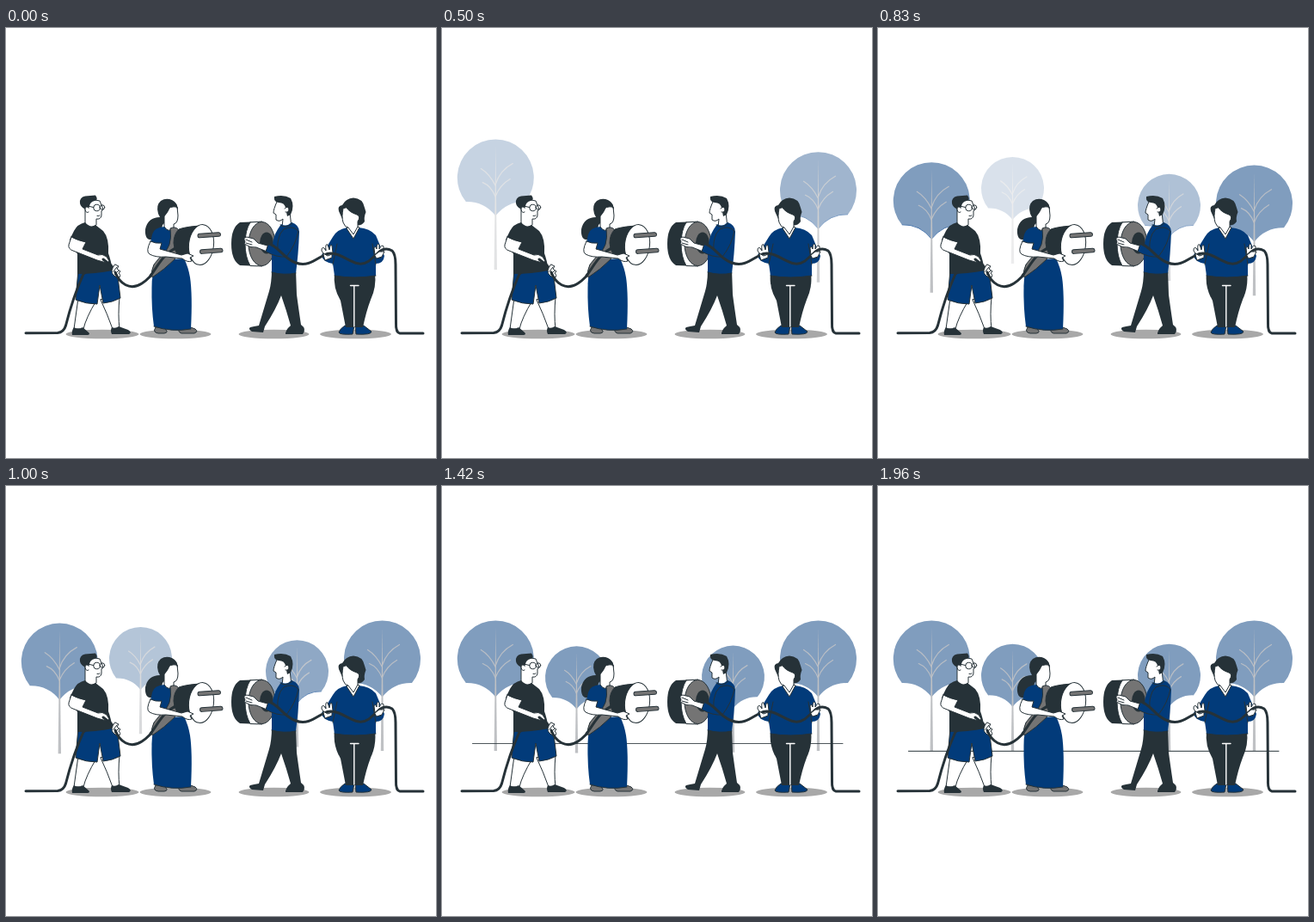
Animation of 500 by 500 pixels, one loop 2 s. Source, as an HTML page:

```html
<!DOCTYPE html>
<html lang="en">
<head>
<meta charset="utf-8">
<title>Plug and socket</title>
<style>
html, body { margin: 0; width: 100%; height: 100%; overflow: hidden; background: #fff; }
svg { display: block; width: 100vw; height: 100vh; }
.ink { fill: #263238; }
.navy { fill: #023b7a; }
.grey { fill: #747474; }
.skin { fill: #fff; stroke: #263238; stroke-width: 1; stroke-linejoin: round; stroke-linecap: round; }
.edge { stroke: #263238; stroke-width: 1; stroke-linejoin: round; }
.thin { fill: none; stroke: #263238; stroke-width: 1; stroke-linecap: round; stroke-linejoin: round; }
.pale { fill: none; stroke: #fff; stroke-width: 1.4; stroke-linecap: round; }
.rope { fill: none; stroke: #263238; stroke-width: 3; stroke-linecap: round; stroke-linejoin: round; }
.shade { fill: #a8a8a8; }
.leaf { fill: #809dbe; }
.rim { fill: none; stroke: #2f62a0; stroke-width: 1; }
.wood { fill: none; stroke: #b9bec5; stroke-linecap: round; stroke-width: 1.2; }
</style>
</head>
<body>
<svg viewBox="0 0 500 500" preserveAspectRatio="none">
  <g id="trees"></g>
  <path id="ground" class="thin" d="M35.5 308.3H466"/>

  <g class="shade">
    <ellipse cx="112" cy="356" rx="42.5" ry="5.300"/>
    <ellipse cx="197" cy="356" rx="41.5" ry="5.300"/>
    <ellipse cx="311.5" cy="356" rx="41" ry="5.300"/>
    <ellipse cx="406.5" cy="356" rx="41.5" ry="5.300"/>
  </g>

  <!-- man in shorts -->
  <g>
    <path class="skin" d="M84 314L79 350H90Q93 337 105 317Z"/>
    <path class="skin" d="M110 316Q118 333 124 350H132Q130 334 132 313Z"/>
    <path class="ink" d="M79 348Q76 352 77 357H95Q99 356 95 353L89 348Q84 351 79 348Z"/>
    <path class="ink" d="M123 348Q121 352 123 356H143Q147 354 142 351L131 347Q127 350 123 348Z"/>
    <path class="navy edge" d="M84 281L81 316Q93 321 106 321L109 299L113 320Q124 319 133 314L129 281Z"/>
    <path class="rope" d="M23 354.800L60 354.500Q67 354 69.500 346C74 328 81 306 90 286L110 270"/>
    <path class="skin" d="M92 208L92 228Q99 235 105 229L105 222Q110 223 111 218L111 213L113 211L109 201L98 199Z"/>
    <path class="ink" d="M86 204Q85 197 92 195.500L104 194.500Q108 200 103 201Q98 202 97 207L95 214L91 210Q87 208 86 204Z"/>
    <path class="skin" d="M96 209Q92 206 92 211Q93 216 96 214"/>
    <g class="thin">
      <circle cx="105.500" cy="209" r="3.800"/><circle cx="112" cy="208.500" r="2.700"/>
      <path d="M101.700 208.500L95 207M106 218.500Q108 219 109 218"/>
    </g>
    <path class="ink" d="M92 226Q83 228 79 236L74 246L83 263L83 286Q104 286 124 282Q122 270 119 262Q120 244 113 236L104 229Q98 233 92 226Z"/>
    <path class="skin" d="M76 243L73 252Q72 257 78 259L106 270L113 272Q119 274 120 271L117 266Q112 262 107 264L89 257L93 249Q83 247 76 243Z"/>
    <path class="rope" d="M113 269L122 276L128 284"/>
    <path class="skin" d="M124 279Q121 285 127 289L132 290Q134 287 131 285L133 283L129 280L131 277L127 275Z"/>
    <path class="rope" d="M127 284C132 297 144 306 158 297C174 287 181 268 198 256"/>
    <path class="thin" d="M126 287L131 282M125 283L129 278"/>
  </g>

  <!-- woman in sari -->
  <g>
    <path class="grey edge" d="M174 348Q170 354 177 355H184Q189 354 186 351L183 347Z"/>
    <path class="grey edge" d="M202 349Q199 353 204 355H219Q224 353 220 350L212 347Z"/>
    <path class="ink" d="M180 201Q174 206 177 216L179 220Q165 220 162 234Q161 248 171 246Q181 241 182 229L199 212Q200 203 193 200Q186 197 180 201Z"/>
    <path class="navy" d="M184 231Q172 232 170 240L168 250L181 262L206 263L203 240L196 232Z"/>
    <path class="skin" d="M184 218L184 231Q189 239 195 232L195 228Q200 227 200 218L199 208Q190 207 187 212Q184 211 183 215Z"/>
    <path class="ink" d="M179 203Q187 196 195 202Q200 205 200 212Q197 205 191 208Q188 216 183 220L179 217Z"/>
    <path class="navy" d="M177 270Q169 285 169.500 302Q169 325 172 347Q193 354 215 350Q217 310 214 290Q212 278 207 268Z"/>
    <path class="thin" d="M172 347Q193 354 215 350"/>
    <path class="grey edge" d="M191 233Q197 230 201 235Q205 243 203 254L196 269Q184 281 170 290Q168 283 172 275L181 264Q194 255 191 233Z"/>
    <path class="rope" d="M168 288C176 278 183 261 200 255"/>
    <path class="ink edge" d="M201 234Q195 240 195 250Q196 262 203 266L226 273L231 230Q213 230 201 234Z"/>
    <ellipse class="skin" cx="227" cy="252" rx="14.500" ry="23.500" transform="rotate(6 227 252)"/>
    <path class="skin" d="M168 248Q162 260 167 263Q174 267 186 266L205 268Q211 273 216 271L214 267L218 265L211 262L204 264L179 257L181 250Q174 251 168 248Z"/>
    <g class="grey edge">
      <rect x="223" y="238.500" width="26.500" height="4.600" rx="2.300" transform="rotate(-4 236 241)"/>
      <rect x="225.500" y="257" width="26.500" height="4.600" rx="2.300" transform="rotate(-4 239 259)"/>
    </g>
  </g>

  <!-- man with socket -->
  <g>
    <path class="ink" d="M272 226L298 225L297 277L272 276Q262 270 262 251Q262 232 272 226Z"/>
    <path class="skin" d="M284 226L298 225L298 277L284 276.500Q278 266 278 251Q278 235 284 226Z"/>
    <ellipse class="grey edge" cx="297.500" cy="251" rx="15.500" ry="25.500"/>
    <ellipse class="ink" cx="303" cy="250" rx="8" ry="12.500"/>
    <path class="ink" d="M309 280Q309 296 306 306L294 346Q288 347 284 348Q281 350 286 353L299 354L301 347Q314 327 320 311Q326 328 331 346Q325 351 325 356H345Q350 350 343 345Q340 325 338 310L337 280Z"/>
    <path class="skin" d="M315 202Q311 211 311 215L314 217L314 223Q318 226 322 222L321 232H332L330 214L331 201Z"/>
    <path class="ink" d="M312 196Q323 193 331 198Q336 207 331 217L327 219L325 209Q324 203 317 203Q311 202 312 196Z"/>
    <path class="skin" d="M324 210Q328 206 329 211Q328 215 325 214"/>
    <path class="navy" d="M320 228Q326 232 332 226Q341 229 341 237Q340 264 337 285Q323 288 309 284L309 265Q309 244 316 234Z"/>
    <path class="thin" d="M309 284Q323 288 337 285M319 229Q325 234 333 227"/>
    <path class="skin" d="M304 253L293 250L288 245L280 243Q275 244 278 248L277 251Q284 256 291 255L306 261Z"/>
    <path class="thin" d="M279 246L286 249M279 250L286 252"/>
    <path class="navy edge" d="M319 239Q315 249 316 256L305 251L302 260Q315 267 326 266Q337 252 340 236Q333 229 323 234Z"/>
    <path class="rope" d="M304 250C318 254 322 268 337 273"/>
  </g>

  <!-- woman with cable -->
  <g>
    <path class="navy edge" d="M394 346Q388 350 387 354Q388 357 403 356L405 346Z"/>
    <path class="navy edge" d="M406 346L407 356Q425 357 425 353L416 346Z"/>
    <path class="ink" d="M382 285Q380 302 389 317L395 348H415Q419 329 424 316Q431 301 429 285Z"/>
    <path class="pale" d="M400.500 299.500H410M404.800 300V347"/>
    <path class="ink" d="M387 213Q385 207 391 206Q395 198 404 197.500Q415 198 417 209L418.500 214Q416 220 417 225Q413 231 405 229L391 222Z"/>
    <path class="skin" d="M392 210Q390 219 392 226Q394 232 398 232L398 238L404 244L409 233L409 225Q413 219 408 217Q399 214 396 209Z"/>
    <path class="navy" d="M397 232Q385 234 380 243L367 264Q368 272 380 274L382 288Q405 292 430 288L430 274Q439 274 440 265L430 241Q423 233 410 232L404 244Z"/>
    <path class="skin" d="M396 233L404 245L411 232L409 231L404 240L398 232Z"/>
    <path class="thin" d="M382 288Q405 292 430 288M385 251L380 275M426 251L430 275"/>
    <path class="skin" d="M371 265L367 259Q367 254 370 256L372 259Q371 250 374 252L376 258Q377 250 379 253L380 261L378 267Z"/>
    <path class="skin" d="M429 264L428 256Q429 252 431 257Q431 249 434 252L434 257Q437 251 439 254L439 261L436 267Z"/>
    <path class="rope" d="M337 273C351 278 360 269 370 264Q377 260 387 264C401 270 410 279 422 271L432 262Q440 254 449 259Q453 263 453 275L453.500 343Q453 354 458 355H485"/>
    <path class="skin" d="M369 262L374 265L379 263L379 267L371 270Z"/>
    <path class="skin" d="M429 264L434 260L440 260L437 266L431 268Z"/>
  </g>
</svg>
<script>
const LOOP = 2000, DROP = 48, FAINT = .13, NS = "http://www.w3.org/2000/svg";
const trees = document.getElementById("trees");

// Leaf is drawn around its centre; trunk reaches the ground at y = 308.
function tree(x, y, r, start, span, drop = DROP) {
  const g = document.createElementNS(NS, "g");
  const k = r / 44.5, foot = 308 - y;
  const p = (...v) => v.map(n => (n * k).toFixed(2)).join(" ");
  const bottom = `M${p(34.5, 28.5)}Q${p(13, 28, 0, 45)}Q${p(-13, 28, -34.5, 28.5)}`;
  g.innerHTML = `
    <path class="leaf" d="${bottom}A${r} ${r} 0 1 1 ${p(34.5, 28.5)}Z"/>
    <path class="rim" d="${bottom}"/>
    <path class="wood" d="M${p(-17, -10)}Q${p(-7, -4, 0, 10)}M${p(20, -16)}Q${p(5, -8, 0, 8)}M${p(-15, 6)}Q${p(-5, 10, 0, 23)}M${p(17, 2)}Q${p(5, 9, 0, 22)}"/>
    <path d="M0 ${-36 * k}L1.7 ${foot}H-1.7Z" fill="#bfc1c4"/>`;
  trees.append(g);
  return { el: g, rim: g.querySelector(".rim"), x, y, start, span, drop };
}

const parts = [
  tree(437.5, 200.5, 44.5, 0, 1000),
  tree(62.3, 200.5, 44.5, 135, 1030),
  tree(338.5, 220, 36.5, 290, 1230, 37),
  tree(156.5, 220, 36.5, 480, 1230),
  { el: document.getElementById("ground"), x: 0, y: 0, start: 800, span: 1150, drop: DROP }
];

const bez = (a, b, s) => 3 * a * s * (1 - s) ** 2 + 3 * b * s * s * (1 - s) + s ** 3;

// Cubic curve (.36, -.01, .5, 1.38): falls, overshoots, settles.
function ease(x) {
  if (x <= 0) return 0;
  if (x >= 1) return 1;
  let lo = 0, hi = 1;
  for (let i = 0; i < 24; i++) {
    const mid = (lo + hi) / 2;
    if (bez(.36, .5, mid) < x) lo = mid; else hi = mid;
  }
  return bez(-.01, 1.38, lo);
}

function draw(t) {
  for (const p of parts) {
    const e = ease((t - p.start) / p.span);
    p.el.setAttribute("transform", `translate(${p.x} ${(p.y + (e - 1) * p.drop).toFixed(2)})`);
    p.el.setAttribute("opacity", e < FAINT ? 0 : Math.min(1, e));
    if (p.rim) p.rim.setAttribute("opacity", e > .6 && e < 1 ? .8 : 0);
  }
}

const begin = performance.now();
function tick() {
  draw((performance.now() - begin) % LOOP);
  requestAnimationFrame(tick);
}
draw(0);
requestAnimationFrame(tick);
</script>
</body>
</html>
```
